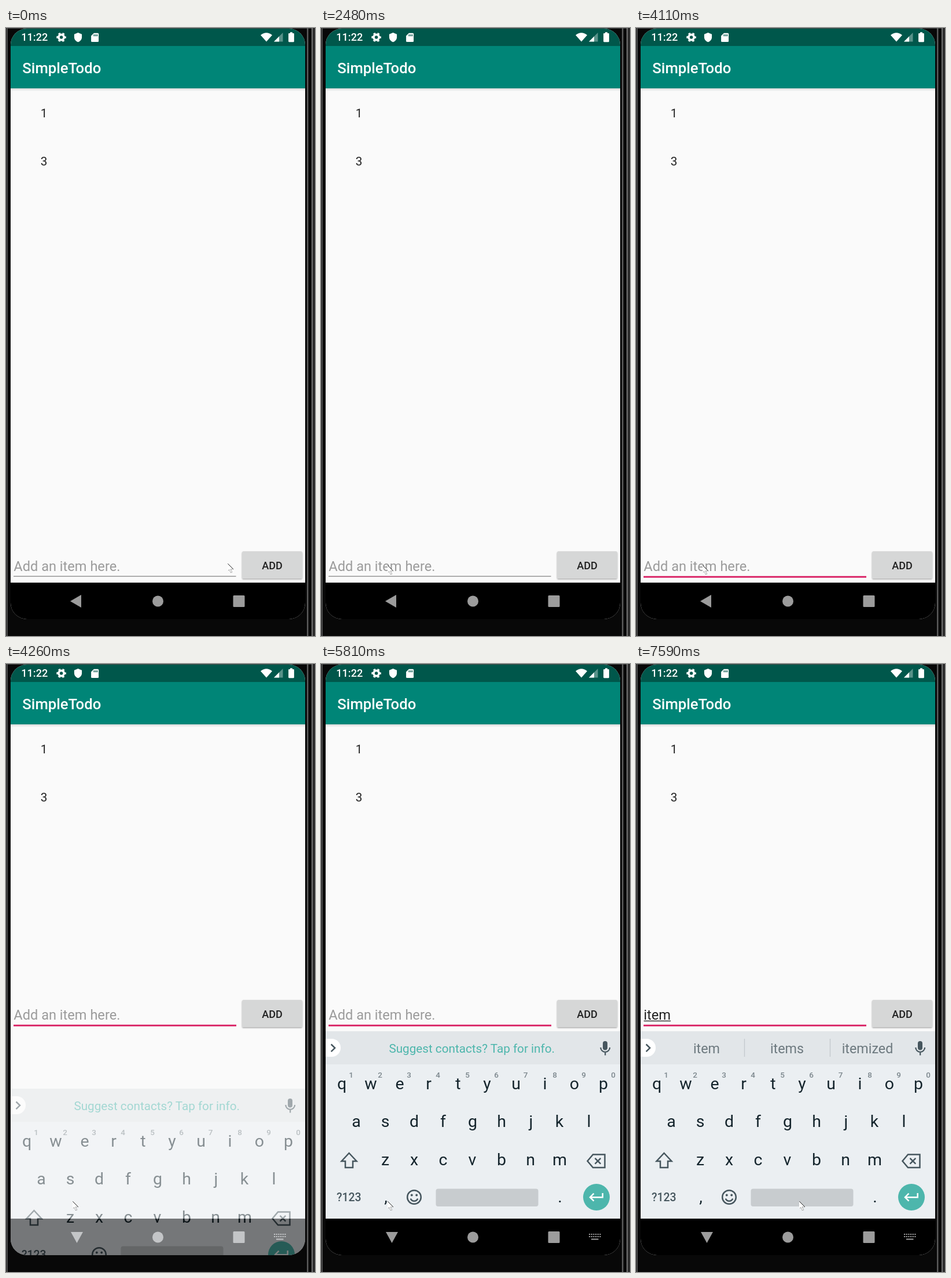
Write an HTML page that moves like this. It is 534 px wide and 1048 px high and loops after 8 s.

```html
<!DOCTYPE html>
<html lang="en">
<head>
<meta charset="utf-8">
<title>Todo list</title>
<style>
html, body { margin: 0; width: 100%; height: 100%; overflow: hidden; background: #000; }
svg { display: block; width: 534px; height: 1048px; font-family: Roboto, "Noto Sans", sans-serif; }
.mid { text-anchor: middle; }
.bold { font-weight: 500; }
.field { font-size: 23.6px; }
.keys { font-size: 28.5px; fill: #14242c; text-anchor: middle; }
.nums { font-size: 13.5px; font-weight: 500; fill: #7b868c; text-anchor: middle; }
.icon { fill: none; stroke: #46565e; stroke-width: 2.5; }
.words { font-size: 23.3px; fill: #6d797f; text-anchor: middle; }

#pointer, #entry, #idle, #focus, #hint, #caret, #board, #back, #down,
#tip, #words, #w1, #w2, #w3 { animation: 8s step-end infinite; }
#pointer { animation-name: pointer; }
#entry { animation-name: entry; }
#idle { animation-name: idle; }
#focus { animation-name: focus; }
#hint { animation-name: hint; }
#caret { animation-name: caret, caretx; }
#board { animation-name: board; }
#back { animation-name: back; }
#down { animation-name: down; }
#tip { animation-name: tip; }
#words, #w3 { animation-name: late; }
#w1 { animation-name: w1; }
#w2 { animation-name: w2; }

@keyframes pointer {
  0% { transform: translate(383px, 923px); }
  5.25% { transform: translate(342px, 838px); }
  7.25% { transform: translate(306px, 653px); }
  9.25% { transform: translate(298px, 622px); }
  23.125% { transform: translate(172px, 921px); }
  24.625% { transform: translate(162px, 958px); }
  26.125% { transform: translate(156px, 945px); }
  27.875% { transform: translate(139px, 936px); }
  29.375% { transform: translate(122px, 929px); }
  31% { transform: translate(115px, 926px); }
  79.625%, 100% { transform: translate(282px, 926px); }
}
@keyframes entry {
  0% { transform: none; }
  53.25%, 100% { transform: translateY(-323px); }
}
@keyframes idle { 0% { opacity: 1; } 41%, 100% { opacity: 0; } }
@keyframes focus { 0% { opacity: 0; } 41%, 100% { opacity: 1; } }
@keyframes hint {
  0%, 42.875% { fill: #9b9b9b; opacity: 1; }
  41% { fill: #727272; opacity: 1; }
  84.625%, 100% { fill: #9b9b9b; opacity: 0; }
}
@keyframes caret {
  0%, 51.375%, 60.25%, 72.625%, 94.875%, 100% { opacity: 0; }
  42.875%, 54.75%, 66.625%, 79.625% { opacity: 1; }
}
@keyframes caretx {
  0% { transform: none; }
  84.625% { transform: translateX(5px); }
  86.5% { transform: translateX(26px); }
  88%, 100% { transform: translateX(47px); }
}
@keyframes board {
  0% { opacity: 0; transform: none; }
  53.25% { opacity: .5; transform: translateY(99px); }
  54.75%, 100% { opacity: 1; transform: none; }
}
@keyframes back { 0% { opacity: 1; } 53.25%, 100% { opacity: 0; } }
@keyframes down { 0% { opacity: 0; } 53.25%, 100% { opacity: 1; } }
@keyframes tip { 0% { opacity: 1; } 88%, 100% { opacity: 0; } }
@keyframes late { 0% { opacity: 0; } 88%, 100% { opacity: 1; } }
@keyframes w1 { 0%, 86.5%, 100% { opacity: 0; } 84.625% { opacity: 1; } }
@keyframes w2 { 0%, 88%, 100% { opacity: 0; } 86.5% { opacity: 1; } }
</style>
</head>
<body>
<svg viewBox="0 0 534 1048" xmlns="http://www.w3.org/2000/svg">
  <defs>
    <clipPath id="screen"><rect x="8" y="1" width="509" height="1018" rx="28"/></clipPath>
    <linearGradient id="shade" x2="0" y2="1">
      <stop offset="0" stop-opacity=".13"/><stop offset="1" stop-opacity="0"/>
    </linearGradient>
    <filter id="lift" x="-10%" y="-20%" width="120%" height="150%">
      <feDropShadow dx="0" dy="1.3" stdDeviation="1.2" flood-opacity=".35"/>
    </filter>
  </defs>

  <!-- Device -->
  <rect width="534" height="1048" fill="#080808"/>
  <rect width="534" height="1" fill="#4a4a4a"/>
  <rect width="1" height="1048" fill="#242424"/>
  <rect x="1" width="2" height="1048" fill="#4c4c4c"/>
  <rect x="520" width="2.500" height="1048" fill="#5a5a5a"/>
  <rect x="528" width="2.500" height="1048" fill="#707070"/>
  <rect x="530.500" width="3.500" height="1048" fill="#2a2a2a"/>

  <g clip-path="url(#screen)">
    <rect x="8" y="1" width="509" height="1018" fill="#fafafa"/>
    <rect x="8" y="104" width="509" height="5" fill="url(#shade)"/>
    <rect x="8" y="31" width="509" height="73" fill="#008577"/>
    <rect x="8" y="0" width="509" height="31" fill="#00574b"/>

    <!-- Status bar -->
    <g fill="#fff">
      <text class="bold" x="26.3" y="22.4" font-size="18.1">11:22</text>
      <g transform="translate(95.6 16)">
        <circle r="4.6" fill="none" stroke="#fff" stroke-width="3.7"/>
        <circle r="6.9" fill="none" stroke="#fff" stroke-width="2.8" stroke-dasharray="3.6 3.625" stroke-dashoffset="1.8"/>
      </g>
      <path d="M124.5 8l6.6 2.8v5c0 4-2.8 7.3-6.6 8.4c-3.8-1.1-6.6-4.4-6.6-8.4v-5z"/>
      <path d="M152 8.700h6.600q1.500 0 1.500 1.500v12.200q0 1.500-1.500 1.500h-10q-1.500 0-1.500-1.500v-9z"/>
      <path d="M152.300 11v3.300M154.900 11v3.300M157.500 11v3.300" stroke="#00574b" stroke-width="1.400"/>
      <path d="M440 12.200Q450 4.500 460 12.200L450 23.500z"/>
      <path d="M478.500 8v15.500H463z" opacity=".35"/>
      <path d="M472 14.500v9h-9z"/>
      <path d="M491 7.200h4v1.700h1.800q1.100 0 1.100 1.100v13.100q0 1.100-1.100 1.100h-7.600q-1.100 0-1.100-1.100v-13.100q0-1.100 1.100-1.100h1.800z"/>
      <text class="bold" x="28.300" y="78" font-size="25.700">SimpleTodo</text>
    </g>

    <!-- List -->
    <g font-size="20.7" fill="#212121">
      <text x="59.7" y="153.500">1</text>
      <text x="59.7" y="236.500">3</text>
    </g>

    <!-- Entry row -->
    <g id="entry">
      <rect id="idle" x="13" y="944.500" width="384.500" height="1.200" fill="#7d7d7d"/>
      <rect id="focus" x="13" y="944.700" width="385" height="2.800" fill="#d81b60"/>
      <text id="hint" class="field" x="13.300" y="936">Add an item here.</text>
      <g class="field" fill="#212121">
        <g id="w1"><text x="13.300" y="936">i</text><rect x="13.500" y="937.700" width="5.700" height="1.300"/></g>
        <g id="w2"><text x="13.300" y="936">ite</text><rect x="13.500" y="937.700" width="26" height="1.300"/></g>
        <g id="w3"><text x="13.300" y="936">item</text><rect x="13.500" y="937.700" width="46.500" height="1.300"/></g>
      </g>
      <rect id="caret" x="13" y="911" width="3" height="32" fill="#d81b60"/>
      <rect x="408" y="902" width="104" height="47" rx="2.600" fill="#d6d7d7" filter="url(#lift)"/>
      <text class="mid bold" x="460" y="932.500" font-size="18.100" fill="#212121">ADD</text>
    </g>

    <!-- Navigation bar -->
    <rect x="8" y="956" width="509" height="63"/>
    <g fill="#9c9c9c">
      <path id="back" d="M130 977v22l-19-11z"/>
      <circle cx="262.500" cy="988" r="9.500"/>
      <rect x="392.500" y="978" width="20" height="20" rx="1.500"/>
      <g id="down">
        <path d="M112 979h21l-10.500 19z"/>
        <path d="M463 983h20.500M463 987h20.500" stroke="#9c9c9c" stroke-width="2.200" stroke-dasharray="2.200 1.460"/>
        <path d="M467 991.500h12.500" stroke="#9c9c9c" stroke-width="2"/>
      </g>
    </g>

    <!-- Keyboard -->
    <g id="board">
      <rect x="8" y="633" width="509" height="57" fill="#e2e6e9"/>
      <rect x="8" y="690" width="509" height="266" fill="#ebeff2"/>
      <path d="M8 646h10.500a15.500 15.500 0 0 1 0 31H8z" fill="#fff"/>
      <path class="icon" d="M17.500 655.500l6.500 6.300l-6.500 6.300"/>
      <text id="tip" class="mid" x="260.700" y="669.800" font-size="20.700" fill="#4db6ac">Suggest contacts? Tap for info.</text>
      <g id="words" class="words">
        <text x="122" y="671">item</text>
        <text x="261" y="671">items</text>
        <text x="400" y="671">itemized</text>
        <path d="M187.500 646v31M335.500 646v31" stroke="#c2c8cc" stroke-width="1.300"/>
      </g>
      <rect x="487" y="650" width="8" height="15.500" rx="4" fill="#46565e"/>
      <path class="icon" d="M483.300 661a7.900 7.900 0 0 0 15.800 0M491.200 669v5.500" style="stroke-width:2.200"/>

      <g class="nums">
        <text x="52 102 152 202 253 303 353.500 404 454 505" y="713">1234567890</text>
      </g>
      <g class="keys">
        <text x="36 86 136 186 237 287 337 387 438 488" y="733">qwertyuiop</text>
        <text x="61 111 161 211 262 312 363 412 463" y="798">asdfghjkl</text>
        <text x="111 161 211 261.500 312 362 412.500" y="864">zxcvbnm</text>
        <text x="112 413" y="928">,.</text>
      </g>
      <path class="icon" d="M48.500 843l13 14h-6.500v11h-13v-11h-6.500z"/>
      <path class="icon" d="M470 845.500h20.500v22.500h-20.500l-9.500-11.250zM473.500 851.800l9.800 9.800M483.300 851.800l-9.800 9.800"/>
      <text class="mid bold" x="48.300" y="926" font-size="19.400" fill="#46565e">?123</text>
      <circle class="icon" cx="161" cy="919" r="11.800"/>
      <circle cx="156.800" cy="915.500" r="1.900" fill="#46565e"/>
      <circle cx="165.200" cy="915.500" r="1.900" fill="#46565e"/>
      <path class="icon" d="M154.800 921.500a6.700 6.700 0 0 0 12.400 0"/>
      <rect x="198.500" y="904.500" width="177" height="30.500" rx="4" fill="#c8cccf"/>
      <circle cx="476" cy="919" r="23" fill="#4db6ac"/>
      <path d="M486.700 912v7.200h-21.500M471.500 912.700l-6.500 6.500l6.500 6.500" fill="none" stroke="#fff" stroke-width="2.500"/>
    </g>
  </g>

  <!-- Mouse pointer -->
  <g id="pointer">
    <path d="M0 0v13l3-2.500l2.500 5.500l2.200-1l-2.500-5.200h4.800z" fill="#fff"/>
    <path d="M.3.3l9.500 9.500" stroke="#222" stroke-width="1"/>
    <path d="M9.500 9.800h-4.300l2.500 5.200l-2.200 1l-2.500-5.500l-2 1.700" fill="none" stroke="#444" stroke-width=".9" stroke-dasharray="1.200 1.300"/>
  </g>
</svg>
</body>
</html>
```
